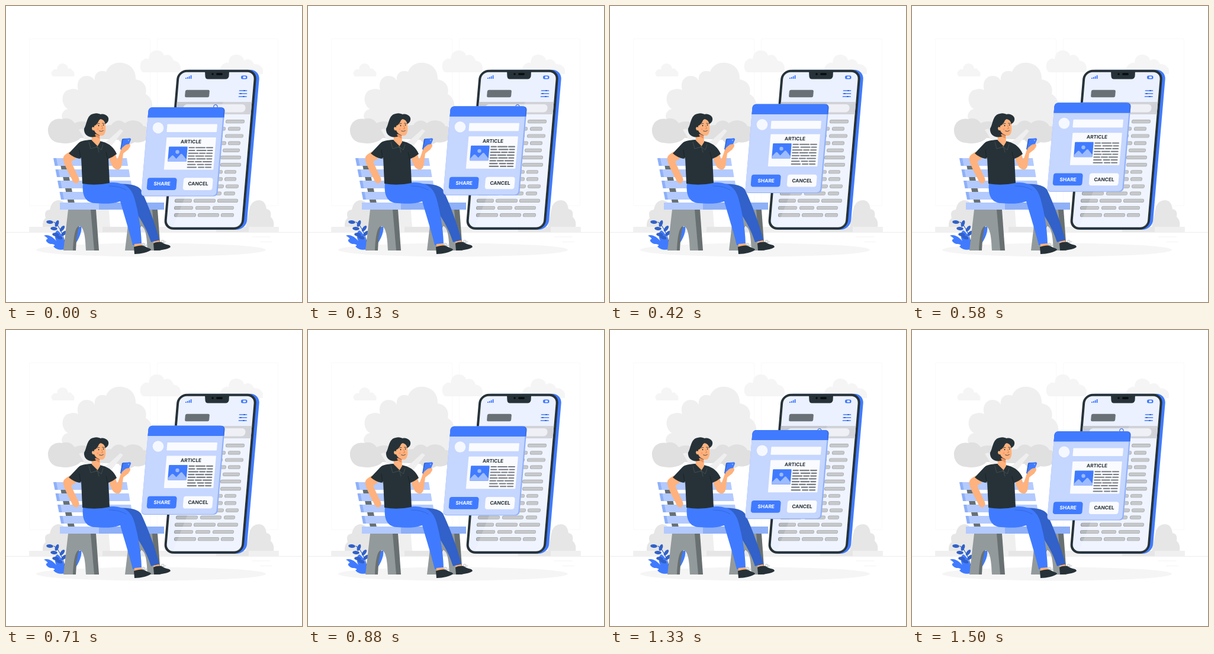
Write an HTML page with a canvas that moves like this. It is 500 px wide and 500 px high and loops after 1540 ms.

```html
<!DOCTYPE html>
<html lang="en">
<head>
<meta charset="utf-8">
<title>Sharing an article</title>
<style>
  html, body { margin: 0; width: 100%; height: 100%; overflow: hidden; background: #fff; }
  canvas { display: block; width: 500px; height: 500px; }
</style>
</head>
<body>
<canvas id="stage"></canvas>
<script>
const BLUE = '#407bff', DEEP = '#3161c9', PALE = '#b3caff', INK = '#263238';
const SKIN = '#ffb27d', SCREEN = '#ecf1ff';
const LOOP = 1540, FPS = 24, RISE = 10, PERIOD = 36;
const SLANT = -0.086;

const canvas = document.getElementById('stage');
const ratio = window.devicePixelRatio || 1;
canvas.width = canvas.height = 500 * ratio;
let ctx;

const fill = (color, d) => { ctx.fillStyle = color; ctx.fill(new Path2D(d)); };

function line(color, width, d) {
  ctx.strokeStyle = color;
  ctx.lineWidth = width;
  ctx.lineCap = ctx.lineJoin = 'round';
  ctx.stroke(new Path2D(d));
}

function oval(color, x, y, rx, ry = rx, turn = 0) {
  ctx.fillStyle = color;
  ctx.beginPath();
  ctx.ellipse(x, y, rx, ry, turn, 0, Math.PI * 2);
  ctx.fill();
}

function box(color, x, y, w, h, r = 0) {
  ctx.fillStyle = color;
  ctx.beginPath();
  ctx.roundRect(x, y, w, h, r);
  ctx.fill();
}

// Draws with x leaning to the left as y grows; x is exact at height y0.
function slanted(y0, draw) {
  ctx.save();
  ctx.transform(1, 0, SLANT, 1, -SLANT * y0, 0);
  draw();
  ctx.restore();
}

function label(text, x, y, size, color) {
  ctx.font = `700 ${size}px Inter, "Open Sans", sans-serif`;
  ctx.textAlign = 'center';
  ctx.textBaseline = 'middle';
  ctx.fillStyle = color;
  ctx.fillText(text, x, y);
}

function drawBackground() {
  box('#fff', 0, 0, 500, 500);
  ctx.strokeStyle = '#f9f9f9';
  ctx.lineWidth = 1;
  for (const x of [39.5, 255.5]) {
    ctx.beginPath();
    ctx.roundRect(x, 55.5, 204, 282, 2);
    ctx.stroke();
  }
  const cloud = '#f5f5f5';
  fill(cloud, 'M79 119Q74 113 79 109Q81 106 86 107Q87 97 96 97Q104 98 105 106Q110 104 112 109Q117 111 115 119Z');
  fill(cloud, 'M232 112C225 109 225 94 232 91Q236 87 241 90Q242 76 254 75Q265 75 267 84Q278 79 283 92Q294 94 295 104Q296 111 290 112Z');
  fill(cloud, 'M362 115Q360 101 369 97Q374 94 376 97Q376 83 389 82Q401 83 402 92Q413 86 419 98Q430 98 434 107L434 115Z');
  drawTree();
  box('#f0f0f0', 39, 373, 422, 9, 1);
  box('#e6e6e6', 163, 373, 83, 9);
  box('#e6e6e6', 355, 373, 55, 9);
  fill('#e6e6e6', 'M62 373Q61 363 67 358Q63 345 74 344Q77 329 88 328Q99 328 105 344L112 373Z');
  fill('#e6e6e6', 'M405 373L412 339Q417 328 427 328Q438 328 440 343Q449 344 447 356Q454 363 452 373Z');
  line('#ededed', 1, 'M0 382.3H500');
  line('#f3f3f3', 1, 'M416 390H446M430 398.5H449');
  oval('#f5f5f5', 245, 412, 194, 11.5);
}

function drawTree() {
  const light = '#efefef', dark = '#e0e0e0';
  fill(light, 'M96 192C91 184 97 175 105 174C92 168 92 143 108 141C114 139 118 140 122 142C118 129 125 118 136 118C143 118 147 121 150 126C148 113 159 107 169 111C174 99 185 95 195 96C210 97 220 109 219 124C233 126 239 137 236 149C246 154 250 167 245 177C249 188 246 200 234 204L150 215Z');
  fill(dark, 'M90 231C77 230 70 219 71 207C73 195 83 189 95 191C102 188 111 190 116 198C126 192 142 195 146 204L178 201C184 191 195 192 201 198C212 189 229 194 232 203C241 202 245 210 242 218C239 229 226 232 217 230C208 236 196 235 190 226L126 223C119 231 102 234 90 231Z');
  fill(light, 'M123 209L129 207L139 222L138 202L145 202L153 240L173 226L193 208L198 211L179 235C171 255 170 300 176 373H138C147 315 149 265 140 236Z');
}

// Each row holds start and end points of its text dashes.
const phoneRows = [
  [340, 366, 371, 403], [340, 371, 375, 396], [340, 366, 370, 401], [335, 372, 375, 396],
  [335, 363, 366, 395], [330, 359, 362, 397], [330, 359, 362, 397], [330, 366, 369, 389],
  [330, 366, 369, 389], [330, 368, 371, 393], [287, 324, 328, 364, 368, 387],
  [285, 314, 317, 354, 357, 392], [284, 316, 320, 345, 349, 385], [284, 321, 324, 360, 363, 385]
];

function drawPhone() {
  slanted(108, () => {
    box(BLUE, 294, 107.8, 135, 270, 16);
    box(INK, 289.5, 107.8, 134.5, 270, 16);
    box(SCREEN, 293.5, 111.8, 126.5, 262, 12);
    box('#c5c8cf', 293.5, 162, 126.5, 21);
    box('#e9ecf4', 305, 166, 105, 13.5, 6);
  });
  fill(INK, 'M336 110H377L376.5 119Q375 123.500 371 123.500H341Q337 123.500 336.500 119Z');
  oval('#080c0e', 349, 115, 1.8);
  box('#080c0e', 355, 113.2, 11, 3.6, 1.8);
  [2, 3, 4.5, 6].forEach((h, i) => box(BLUE, 303 + i * 2.9, 123 - h, 1.9, h, .5));
  box(BLUE, 397, 117.5, 10.5, 6, 2.5);
  box('#fff', 400.5, 119, 4.5, 3, 1);
  slanted(148, () => box('#697176', 302.5, 141.7, 41, 12.6, 2.5));
  line(BLUE, 1.7, 'M394.500 143H406.500M394 148H406.500M393.500 153H406');
  line(DEEP, 2, 'M402 143H403M396 148H397M401 153H402');
  line(DEEP, 1.1, 'M351.500 172A3.200 3.200 0 1 1 357 171M357 173L359 175');
  phoneRows.forEach((row, i) => {
    const y = 195.2 + i * 12.15;
    for (let n = 0; n < row.length; n += 2) {
      slanted(y, () => {
        box('#8c9194', row[n], y - 3.1, row[n + 1] - row[n], 6.2, 2.8);
        box('#b7babc', row[n] + .7, y - 2.5, row[n + 1] - row[n] - 1.2, 5, 2.3);
      });
    }
  });
  // soft reflection over the lower right of the glass
  fill('rgba(255,255,255,.2)', 'M367 162H415L398 366Q396 373 389 373H282Z');
}

function drawPlant() {
  fill(BLUE, 'M64 388C71 385 79 390 85 397C81 389 82 381 87 379C95 384 99 397 101 411C91 413 84 411 80 406C85 404 81 402 75 402C69 400 66 396 69 394C73 394 68 390 64 388Z');
  fill(BLUE, 'M109 411C104 396 112 377 127 372C129 383 121 400 109 411Z');
  line(DEEP, 1.2, 'M101 410C99 392 91 371 81 365');
  const leaves = [[74, 365, .1], [86, 367.5, -1.2], [81, 376, .1], [95, 376, -.9],
    [84, 386, .1], [98, 384, -.7], [90, 391, .3]];
  for (const [x, y, turn] of leaves) oval(DEEP, x, y, 5.8, 2.9, turn);
}

function drawLegFrame(x) {
  ctx.save();
  ctx.translate(x, 0);
  fill('#687071', 'M44 344H55L60 413H50Z');
  fill('#687071', 'M14 372H27C23 380 22 396 21 413H15Z');
  fill('#939a9b', 'M8 344H46L52 413H38C37 390 35 373 27 372C20 371 17 391 16 413H0Z');
  ctx.restore();
}

function drawBench() {
  drawLegFrame(97);
  drawLegFrame(201);
  fill('#687071', 'M90 258H100L116 333H105Z');
  for (let i = 0; i < 4; i++) {
    const x = 80 + i * 3.5, y = 257 + i * 19;
    fill('#8eb0f8', `M${x} ${y}H${x + 10}L${x + 12} ${y + 13}H${x + 2.5}Z`);
    fill(PALE, `M${x + 5} ${y}H${x + 124}L${x + 126} ${y + 13}H${x + 7.5}Z`);
  }
  box(PALE, 91, 332, 66, 12);
  box('#8eb0f8', 157, 332, 110, 12);
}

function drawWoman() {
  // legs and shoes
  fill(DEEP, 'M178 302C204 298 222 302 228 310C241 338 252 368 259 395L245 399C237 373 221 348 207 333Z');
  fill(BLUE, 'M130 299C148 304 172 295 190 299C206 302 213 311 217 325C224 350 228 375 229 401L214 404C209 382 200 355 193 330C180 335 163 334 150 333C133 332 128 318 130 299Z');
  line('#315fd0', .7, 'M174 304Q193 304 203 311');
  fill(SKIN, 'M217 402L229 401L231 407H217ZM249 398L258 396L262 400L250 403Z');
  fill(INK, 'M216 407C222 405 228 404 233 405C238 409 245 409 245 412C240 416 228 419 217 419Z');
  fill(INK, 'M249 401C255 398 262 398 265 400C269 404 277 402 278 407C274 411 260 413 250 413Z');
  line('#a9afb2', .8, 'M232 405Q228 400 232 401Q236 400 232 405L238 404M264 400Q261 394 265 396Q269 395 265 400L270 398');

  // arms
  fill(SKIN, 'M108 246C101 250 95 253 97 261C100 272 107 284 111 292C113 298 117 301 121 299C125 296 124 291 121 287L110 263L122 255Z');
  fill(SKIN, 'M173 252C177 266 180 275 187 276C193 277 195 273 196 265L198 249L207 242L210 234L202 233L195 239L192 249L188 260L184 247Z');
  fill(DEEP, 'M196 225Q197 224 199 224L210 223.500L207 235L203 238L200 244L193 242Z');
  fill(BLUE, 'M198 225L209 223.500Q212 224 211 226L206 238L200 243L194 242Z');
  oval('#dce7ff', 207, 227, .8);
  fill(SKIN, 'M195 241C197 238 200 236 203 234L209 233Q211 235 209 239L202 244L196 247Z');

  // shirt
  fill(INK, 'M143 226C134 227 127 227 122 232L106 249Q114 256 124 258L127 256L129 300Q151 304 175 299L173 258Q181 255 187 250C183 240 175 232 162 229Z');
  line('#172023', .8, 'M126 258L124 243M172 259L169 247');
  fill(SKIN, 'M144 210L145 228Q150 237 156 239Q161 235 159 229L158 214Z');
  fill(INK, 'M144 226L140 230L143 241L155 237ZM160 228L164 234L161 243L154 238Z');
  line('#52605f', .6, 'M140 230L143 241L154 238L161 243L164 234M155 239L157 247');

  // head
  fill(INK, 'M132 207C137 199 136 184 148 182C153 180 158 182 160 183C167 181 175 187 173 193Q172 197 168 199L160 218L150 221C140 223 131 218 132 207Z');
  fill(SKIN, 'M149 201C154 197 156 193 160 191C164 192 166 194 167 197C169 206 169 214 165 218C160 221 151 216 149 210Q146 211 145 207Q145 203 149 205Z');
  fill('#ed935f', 'M152 216L158 219V224Q152 222 150 217Z');
  fill(INK, 'M143 204Q154 203 157 193L153 189L142 195Z');
  oval(INK, 156.5, 202, .8, 1.2);
  oval(INK, 164.5, 201, .7, 1.2);
  line(INK, .8, 'M154 199.500Q155.500 197.500 158 198.500M162.500 198L166 198.500');
  line('#d87647', .8, 'M161.500 202L163.500 207L161 207.500');
  line(INK, .8, 'M157.500 211Q161.500 213 164.500 210.500');
  oval('#ff9c70', 155, 208, 1.8);
}

const articleRows = [[318, 321, 337], [319, 323, 339], [325, 328, 338], [319, 322, 336],
  [321, 324, 339], [319, 322, 333], [322, 326, 337], [324, 328, 338]];

function drawCard() {
  slanted(171, () => {
    box('#91b1fa', 241, 171.2, 129, 150.3, 6);
    box('#c5d6ff', 241, 171.2, 126.8, 149.3, 6);
    box('#3a6fe6', 241, 171.2, 129, 17, [6, 6, 0, 0]);
    box(BLUE, 241, 171.2, 127, 17, [6, 6, 0, 0]);
    box('#fafbff', 275, 199.5, 84.5, 13.5, 1);
    box('#fafbff', 275.8, 222, 83.5, 54.5, 1);
    box(BLUE, 281, 237.5, 31.5, 25.5, 1);
    ctx.save();
    ctx.beginPath();
    ctx.rect(281, 237.5, 31.5, 25.5);
    ctx.clip();
    fill('#9dbbff', 'M278 263L287 253Q289 251 292 255L295 258L302 250Q304 249 306 252L314 261V263Z');
    ctx.restore();
    box(BLUE, 249.5, 290.3, 49.7, 20.7, 4);
    box('#fafbff', 310.5, 290.3, 49.7, 20.7, 4);
  });
  oval('#f5f8ff', 257, 205.9, 9.3);
  oval('#9dbbff', 289.5, 246.5, 3.2);
  articleRows.forEach(([end, start, last], i) => {
    const y = 239.3 + i * 4.75, shift = (y - 239) * SLANT;
    const left = 309.5 + shift;
    line('#777d83', 2.1, `M${left} ${y}H${end + shift}M${start + shift} ${y}H${last + shift - 1}M${last + shift + 2} ${y}H${349 + shift}`);
  });
  for (const [text, x, y, size, color] of [
    ['ARTICLE', 312.5, 229.8, 8.2, INK],
    ['SHARE', 263.7, 301, 8.3, '#fff'],
    ['CANCEL', 324.5, 301, 8.3, INK]
  ]) slanted(y, () => label(text, x, y, size, color));
}

function drawScenery() {
  drawBackground();
  drawPhone();
  drawPlant();
  drawBench();
  drawWoman();
}

const scenery = document.createElement('canvas');
scenery.width = scenery.height = 500 * ratio;
ctx = scenery.getContext('2d');
ctx.scale(ratio, ratio);
drawScenery();

ctx = canvas.getContext('2d');
ctx.scale(ratio, ratio);
const start = performance.now();

function render() {
  const time = Math.max(0, performance.now() - start) % LOOP;
  const step = Math.floor(time * FPS / 1000 + .1) % PERIOD;
  const half = PERIOD / 2;
  const lift = RISE * (1 - Math.abs(step - half) / half);
  ctx.drawImage(scenery, 0, 0, 500, 500);
  ctx.save();
  ctx.translate(0, -lift);
  drawCard();
  ctx.restore();
  requestAnimationFrame(render);
}
render();
</script>
</body>
</html>
```
